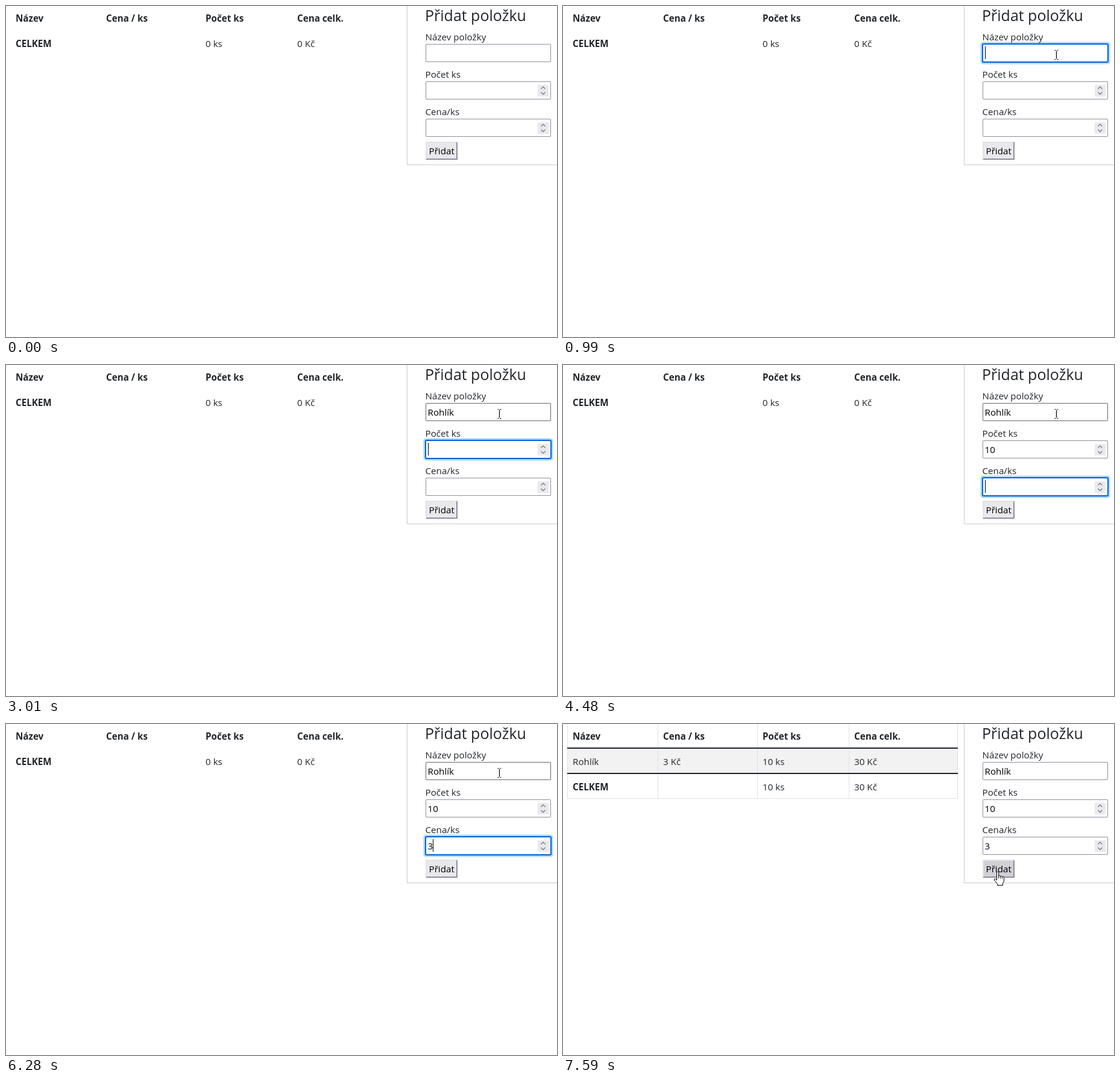
These frames come from a looping animation (914 by 549 pixels, 8 s). An HTML page with a canvas:

```html
<!DOCTYPE html>
<html lang="cs">
<head>
<meta charset="utf-8">
<style>
  html, body { margin: 0; width: 914px; height: 549px; overflow: hidden; background: #fff; }
  canvas { display: block; }
</style>
</head>
<body>
<canvas id="stage" width="914" height="549"></canvas>
<script>
const ctx = document.getElementById('stage').getContext('2d');
const LOOP = 8000, FAMILY = '"Open Sans", "Noto Sans", sans-serif';
const INK = '#212529', GREY = '#8f8f9d';
const COLUMNS = [16, 166, 331, 483];
const FIELDS = [
  { label: 'Název položky', y: 63, typed: [[0, ''], [1520, 'R'], [1850, 'Ro'], [1930, 'Roh'], [2080, 'Rohl'], [2230, 'Rohlí'], [2630, 'Rohlík'], [2770, 'Rohlík ']] },
  { label: 'Počet ks', y: 125, number: true, typed: [[0, ''], [3930, '1'], [4080, '10']] },
  { label: 'Cena/ks', y: 187, number: true, typed: [[0, ''], [6280, '3']] }
];
const FOCUS = [[0, -1], [990, 0], [3010, 1], [4480, 2], [5270, 1], [5730, 2], [7440, -1]];
const CARET = [[0, 0], [990, 1], [1450, 0], [1520, 1], [2000, 0], [2080, 1], [2460, 0], [2630, 1],
  [3550, 0], [3930, 1], [5030, 0], [5730, 1], [6810, 0]];
// Pointer samples: time, x, y
const ENTER = [[130, 586, 522], [210, 740, 177]];
const APPROACH = [[440, 796, 43], [600, 806, 58], [760, 814, 74], [910, 818, 81]];
const LEAVE = [[6810, 818, 81], [6890, 800, 105], [7050, 735, 205], [7210, 667, 265], [7370, 721, 246]];

const at = (steps, t) => steps.filter(s => s[0] <= t).pop()[1];

function along(path, t) {
  const n = path.findIndex(p => p[0] > t);
  if (n < 0) return path[path.length - 1].slice(1);
  const a = path[n - 1], b = path[n], k = (t - a[0]) / (b[0] - a[0]);
  return [a[1] + (b[1] - a[1]) * k, a[2] + (b[2] - a[2]) * k];
}

function pointerAt(t) {
  if (t < 130 || (t >= 290 && t < 440)) return null;
  if (t < 290) return at(ENTER.map(p => [p[0], p.slice(1)]), t);
  const path = t < 6810 ? APPROACH : LEAVE, start = path[0][0];
  return along(path, start + Math.floor((t - start) / 80) * 80).map(Math.round);
}

function rect(x, y, w, h, color) {
  ctx.fillStyle = color;
  ctx.fillRect(x, y, w, h);
}

function round(x, y, w, h, r, color) {
  ctx.fillStyle = color;
  ctx.beginPath();
  ctx.roundRect(x, y, w, h, r);
  ctx.fill();
}

function setFont(size = 15.2, weight = 400) {
  ctx.font = `${weight} ${size}px ${FAMILY}`;
}

function text(s, x, y, color = INK, size, weight) {
  setFont(size, weight);
  ctx.fillStyle = color;
  ctx.fillText(s, x, y);
}

function shape(x, y, d, fill, stroke, width = 1) {
  const p = new Path2D(d);
  ctx.save();
  ctx.translate(x, y);
  ctx.lineWidth = width;
  ctx.lineJoin = 'round';
  if (fill) { ctx.fillStyle = fill; ctx.fill(p); }
  if (stroke) { ctx.strokeStyle = stroke; ctx.stroke(p); }
  ctx.restore();
}

function table(filled) {
  if (filled) {
    rect(7, 41, 648, 41, '#f2f2f2');
    for (const x of [7, 157, 322, 474, 654]) rect(x, 0, 1, 124, '#dee2e6');
    rect(7, 123, 648, 1, '#dee2e6');
    for (const y of [39, 81]) rect(7, y, 648, 2, INK);
  }
  const row = (cells, y, bold) => cells.forEach((s, i) =>
    text(s, COLUMNS[i], y, INK, undefined, bold || s === 'CELKEM' ? 700 : 400));
  row(['Název', 'Cena / ks', 'Počet ks', 'Cena celk.'], 26, true);
  if (filled) row(['Rohlík', '3 Kč', '10 ks', '30 Kč'], 68);
  row(filled ? ['CELKEM', '', '10 ks', '30 Kč'] : ['CELKEM', '', '0 ks', '0 Kč'], filled ? 110 : 68);
}

function field(f, t, focused, hovered) {
  const y = f.y, value = at(f.typed, t);
  if (focused) {
    round(692, y - 4, 216, 38, 5, '#d3ecfb');
    round(693, y - 3, 214, 36, 4, '#a6d8f7');
    round(695, y - 1, 210, 32, 3, '#0060df');
    round(697, y + 1, 206, 28, 1, '#fff');
  } else {
    round(696, y, 208, 30, 2, hovered ? '#676774' : GREY);
    round(697, y + 1, 206, 28, 1, '#fff');
  }
  text(f.label, 695.5, y - 6);
  if (f.number) {
    rect(882, y + 6, 18, 19, '#e9e9ed');
    shape(891, y + 15, 'M-3.5-2.5L0-6L3.5-2.5M-3.5 3L0 6.5L3.5 3', null, '#74747d', 1.2);
  }
  setFont();
  const width = ctx.measureText(value).width;
  const selected = focused && t >= 5270 && t < 5730;
  if (selected) rect(700, y + 4, Math.round(width), 21, '#0078d7');
  text(value, 699.5, y + 21, selected ? '#fff' : '#000');
  if (focused && at(CARET, t)) rect(Math.floor(700 + width), y + 4, 1, 21, '#000');
}

function button(hovered, pressed) {
  const light = pressed ? GREY : '#e3e3e6', dark = pressed ? '#e3e3e6' : GREY;
  rect(696, 225, 53, 30, light);
  shape(696, 225, 'M53 0V30H0L2 28H51V2Z', dark);
  rect(698, 227, 49, 26, pressed ? '#b1b1b9' : hovered ? '#d0d0d7' : '#e9e9ed');
  text('Přidat', 701.5, 246, '#000');
}

function pointer(x, y, kind) {
  if (kind === 'beam') {
    shape(x, y, 'M-2.5-7.5H-.5M1.5-7.5H3.5M.5-6.5V6.5M-2.5 7.5H-.5M1.5 7.5H3.5', null, '#000', 1.2);
  } else if (kind === 'hand') {
    shape(x, y, 'M-1.5 0Q0-2.5 1.7 0V6Q3.5 4.5 4.7 6.5Q6.5 5.3 7.7 7.3Q10.5 6.3 10.5 9.5V13Q10.5 16 8.5 18V21.5H-.5V19L-5.5 13Q-6.5 10.5-4.3 10.5L-1.5 13ZM1.7 5V10M4.7 6.5V10.5M7.7 7.3V10.5', '#fff', '#000');
  } else {
    shape(x, y, 'M.5.5V16.5L4.2 13L6.7 18.7L9.2 17.6L6.8 12.2H12Z', '#fff', '#000');
  }
}

function draw(t) {
  rect(0, 0, 914, 549, '#fff');
  const pos = pointerAt(t), focus = at(FOCUS, t);
  const inside = (x, y, w, h) => pos && pos[0] >= x && pos[0] < x + w && pos[1] >= y && pos[1] < y + h;
  const over = FIELDS.findIndex(f => inside(696, f.y - 24, 208, 54));
  const onButton = inside(696, 225, 53, 30);

  table(t >= 7590);
  rect(665, 0, 1, 264, '#ccc');
  rect(665, 263, 249, 1, '#ccc');
  text('Přidat položku', 695, 25, INK, 25);
  FIELDS.forEach((f, i) => field(f, t, focus === i, over === i));
  button(onButton, t >= 7440 && t < 7590);
  if (pos) pointer(...pos, onButton ? 'hand' : over >= 0 ? 'beam' : 'arrow');
}

const start = performance.now();
function tick() {
  draw((performance.now() - start) % LOOP);
  requestAnimationFrame(tick);
}
tick();
</script>
</body>
</html>
```
